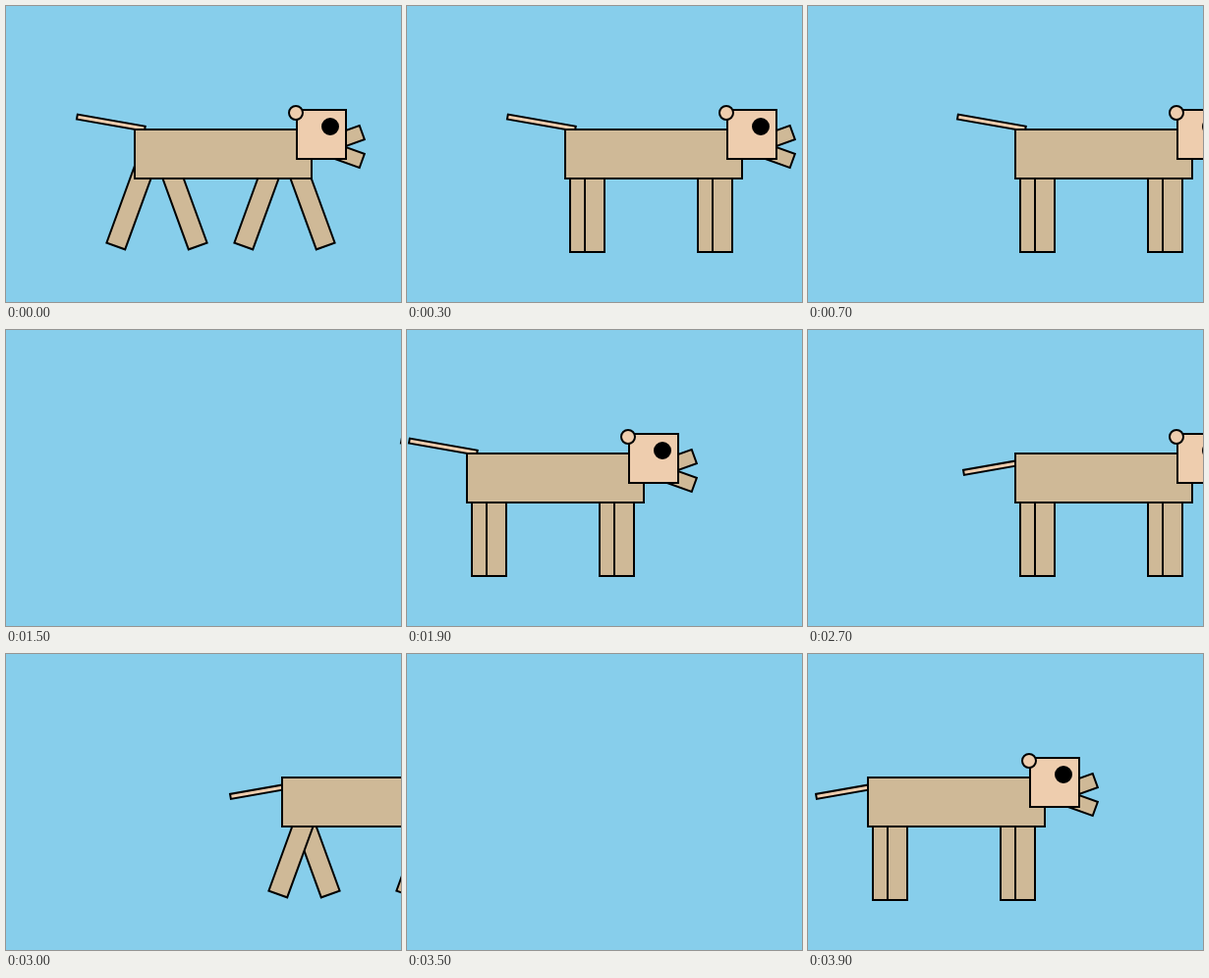
Recreate the animation shown at these times as an HTML page with a canvas. Size 402 by 302 pixels, loop 4.1 s.

```html
<!DOCTYPE html>
<html lang="en">
<head>
<meta charset="utf-8">
<title>Walking dog</title>
<style>
  html, body { margin: 0; width: 100%; height: 100%; overflow: hidden; background: #87ceeb; }
  canvas { display: block; }
</style>
</head>
<body>
<canvas id="stage" width="402" height="302"></canvas>
<script>
const ctx = document.getElementById('stage').getContext('2d');
const SKY = '#87ceeb', COAT = '#cfb997', SKIN = '#eecdae', INK = '#000';
const TICK = 100, TICKS = 40, LOOP = 4100, LAP = 20, WRAP = 600;

// Strides of one lap: the dog speeds up until it is back at its start.
const strides = [0, 1, 1, 1, 1, 1, 2, 1, 2, 3, 2, 3, 4, 3, 4, 4, 5, 5, 5, 5];
let run = 0;
const path = strides.map(s => {
  run += s * 10;
  return run > 335 ? run - WRAP : run;
});

function paint(fill) {
  ctx.fillStyle = fill;
  ctx.fill();
  ctx.stroke();
}

function box(x, y, w, h, fill) {
  ctx.beginPath();
  ctx.rect(x, y, w, h);
  paint(fill);
}

function disc(x, y, r, fill) {
  ctx.beginPath();
  ctx.arc(x, y, r, 0, 2 * Math.PI);
  paint(fill);
}

// Box placed relative to a pivot and turned around it.
function limb(px, py, deg, x, y, w, h, fill) {
  ctx.save();
  ctx.translate(px, py);
  ctx.rotate(deg * Math.PI / 180);
  box(x, y, w, h, fill);
  ctx.restore();
}

function drawDog(x, swing, wag) {
  ctx.save();
  ctx.translate(x, 0);
  limb(167, 112, wag, -93, 15, 70, 5, SKIN);
  for (const hip of [146, 276]) {
    limb(hip, 151, swing, -10, 0, 20, 100, COAT);
    limb(hip + 15, 151, -swing, -10, 0, 20, 100, COAT);
  }
  box(131, 126, 180, 50, COAT);
  limb(362.3, 129, -20, -30, -7.5, 30, 15, COAT);
  limb(362.3, 158, 20, -30, -7.5, 30, 15, COAT);
  box(296, 106, 50, 50, SKIN);
  disc(295, 109, 7, SKIN);
  disc(330, 123, 8, INK);
  ctx.restore();
}

function render(now) {
  const i = Math.min(TICKS - 1, Math.floor(now % LOOP / TICK));
  ctx.fillStyle = SKY;
  ctx.fillRect(0, 0, 402, 302);
  ctx.strokeStyle = INK;
  ctx.lineWidth = 2;
  drawDog(path[i % LAP], [20, 0, -20, 0][i % 4], i < LAP ? 10 : -10);
}

const start = performance.now();
function loop() {
  render(performance.now() - start);
  requestAnimationFrame(loop);
}
loop();
</script>
</body>
</html>
```
